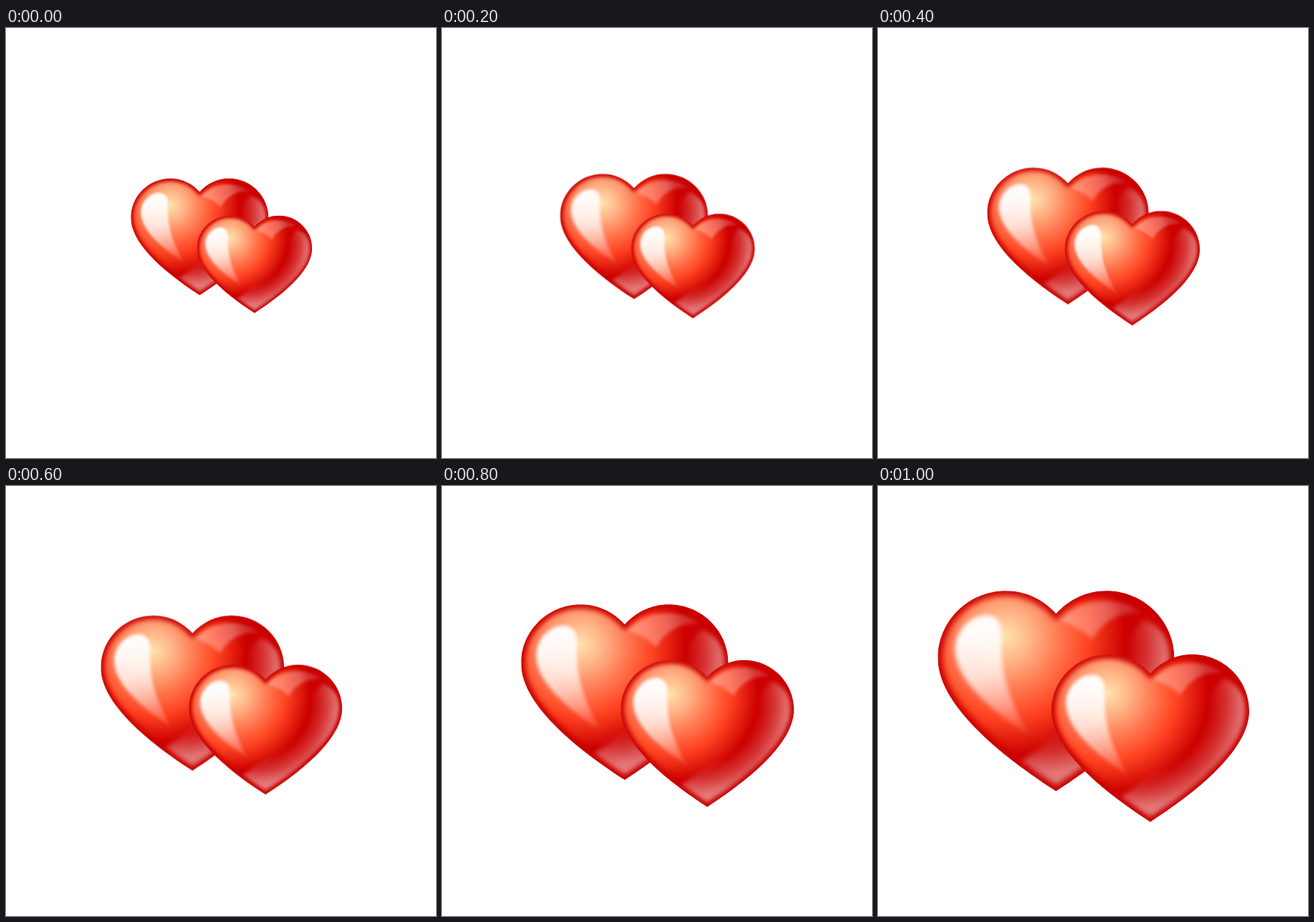
Write an HTML page that moves like this. It is 600 by 600 pixels and loops after 1200 ms.

```html
<!DOCTYPE html>
<html lang="en">
<head>
<meta charset="utf-8">
<title>Two hearts</title>
<style>
  html, body { margin: 0; width: 100%; height: 100%; overflow: hidden; background: #fff; }
  svg { display: block; width: 100%; height: 100%; }
  .pair {
    transform-origin: 300.5px 299px;
    animation: grow 1200ms step-end infinite;
  }
  @keyframes grow {
    0%      { transform: scale(.582); }
    16.667% { transform: scale(.625); }
    33.333% { transform: scale(.683); }
    50%     { transform: scale(.775); }
    66.667% { transform: scale(.876); }
    83.333%, 100% { transform: scale(1); }
  }
</style>
</head>
<body>
<svg viewBox="0 0 600 600">
  <defs>
    <path id="outline" d="M0 32C-18 12-43 0-70 0C-122 0-165 42-165 94C-165 150-100 215 0 279.5
      C100 215 165 150 165 94C165 42 122 0 70 0C43 0 18 12 0 32Z"/>
    <clipPath id="inside"><use href="#outline"/></clipPath>

    <radialGradient id="body" gradientUnits="userSpaceOnUse" cx="-70" cy="64" r="172">
      <stop offset="0" stop-color="#ffe2ac"/>
      <stop offset=".2" stop-color="#ffb488"/>
      <stop offset=".42" stop-color="#ff7c54"/>
      <stop offset=".66" stop-color="#ff4422"/>
      <stop offset=".97" stop-color="#cc0000"/>
    </radialGradient>
    <linearGradient id="shine" gradientUnits="userSpaceOnUse" x1="-118" y1="60" x2="-48" y2="200">
      <stop offset="0" stop-color="#fff" stop-opacity=".96"/>
      <stop offset=".35" stop-color="#fff" stop-opacity=".75"/>
      <stop offset="1" stop-color="#fff" stop-opacity=".08"/>
    </linearGradient>
    <linearGradient id="crest" gradientUnits="userSpaceOnUse" x1="30" y1="50" x2="118" y2="26">
      <stop offset="0" stop-color="#fff" stop-opacity=".3"/>
      <stop offset=".5" stop-color="#fff" stop-opacity=".3"/>
      <stop offset="1" stop-color="#fff" stop-opacity=".1"/>
    </linearGradient>
    <radialGradient id="glow" gradientUnits="userSpaceOnUse" cx="-20" cy="80" r="190">
      <stop offset=".62" stop-color="#fff" stop-opacity="0"/>
      <stop offset=".78" stop-color="#fff" stop-opacity=".2"/>
      <stop offset=".93" stop-color="#fff" stop-opacity=".48"/>
    </radialGradient>

    <filter id="soft" x="-30%" y="-30%" width="160%" height="160%" color-interpolation-filters="sRGB">
      <feGaussianBlur stdDeviation="3"/>
    </filter>
    <filter id="softer" x="-30%" y="-30%" width="160%" height="160%" color-interpolation-filters="sRGB">
      <feGaussianBlur stdDeviation="4.5"/>
    </filter>

    <g id="heart" clip-path="url(#inside)">
      <use href="#outline" fill="url(#body)"/>
      <path fill="url(#glow)" filter="url(#softer)"
        d="M122 40C148 50 165 70 165 94C165 150 100 215 0 279.5L-52 240C-30 225-10 212 10 190L60 120Z"/>
      <path fill="url(#crest)" filter="url(#soft)"
        d="M4 42C20 24 42 14 70 14C90 14 108 20 120 32C94 28 68 38 50 68C38 56 22 46 4 42Z"/>
      <path fill="url(#shine)" filter="url(#soft)"
        d="M-98 34C-80 34-74 48-76 72C-78 118-62 160-36 203C-82 172-140 128-141 82C-141 56-120 34-98 34Z"/>
      <use href="#outline" fill="none" stroke="#c80000" stroke-width="13" filter="url(#softer)"/>
    </g>
  </defs>

  <g class="pair">
    <use href="#heart" transform="translate(248.5 146.2)"/>
    <use href="#heart" transform="translate(380 235) scale(.836)"/>
  </g>
</svg>
</body>
</html>
```
